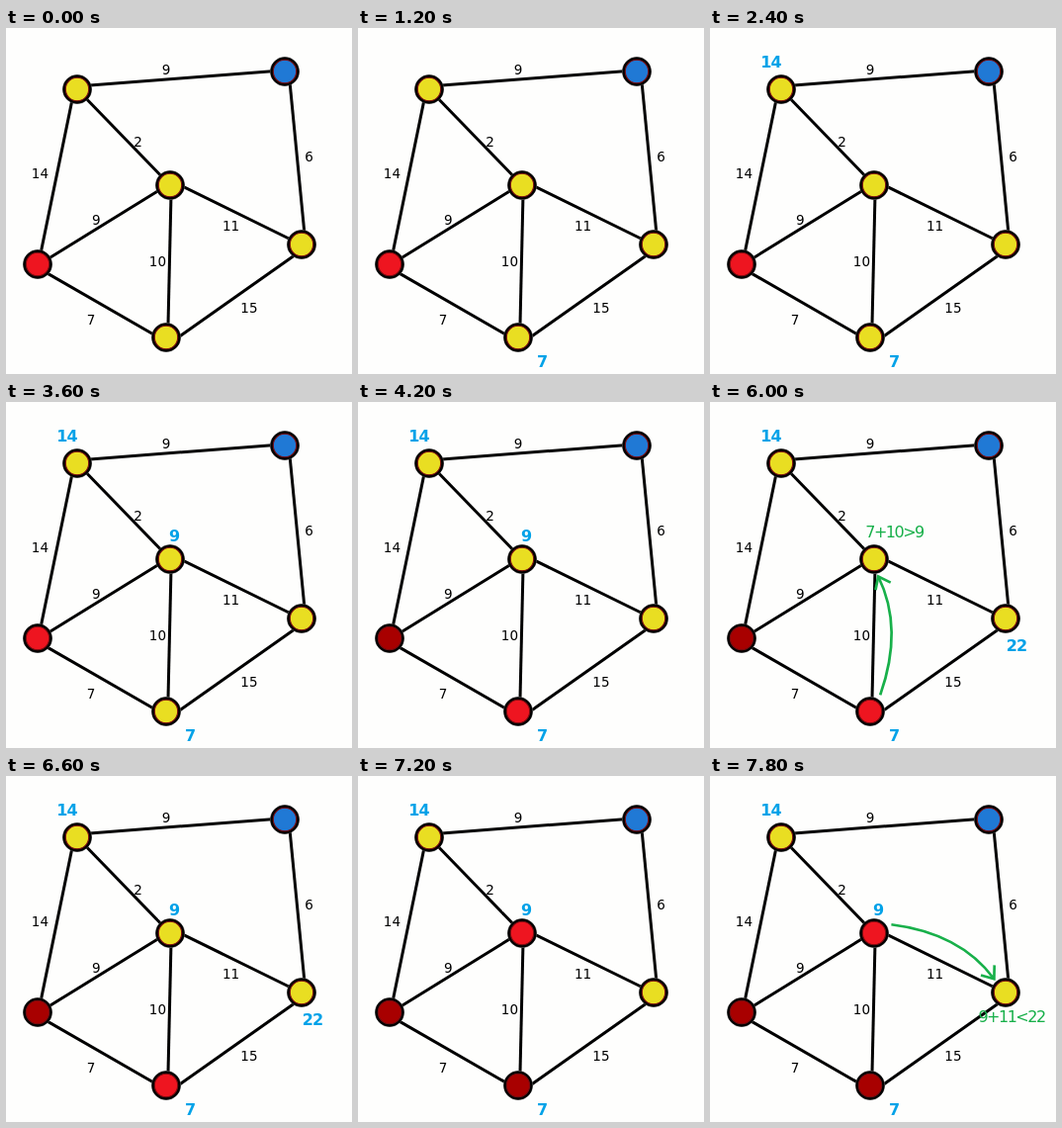
An HTML page for the animation above (8 s loop, 350 by 350 pixels).

```html
<!DOCTYPE html>
<html lang="en">
<head>
<meta charset="utf-8">
<title>Shortest path steps</title>
<style>
  html, body { margin: 0; width: 100%; height: 100%; overflow: hidden; background: #fefefd; }
  svg { display: block; width: 100%; height: 100%; }
  text { font: 13.5px "DejaVu Sans", sans-serif; text-anchor: middle; }
  .edge { stroke: #000; stroke-width: 3; }
  .halo { fill: none; stroke: #777; stroke-width: 1; }
  .node { stroke: #000; stroke-width: 2.8; }
  .rim { fill: none; stroke: #7a0c10; stroke-width: 1.1; }
  .value { font-size: 16px; font-weight: bold; letter-spacing: -1px; fill: #00a2e8; }
  .sum { font-size: 16px; letter-spacing: -1.5px; fill: #18b04a; }
  .arrow { fill: none; stroke: #18b04a; stroke-width: 2.7; }
</style>
</head>
<body>
<svg viewBox="0 0 350 350">
  <defs>
    <marker id="tip" orient="auto" markerUnits="userSpaceOnUse" markerWidth="30" markerHeight="30" overflow="visible">
      <path class="arrow" d="M-11-8.5L0 0L-11 8.5"/>
    </marker>
  </defs>
</svg>
<script>
const STEP = 600, LOOP = 8000;
const YELLOW = '#e9de22', RED = '#ee1520', DONE = '#a80000', BLUE = '#2079d5';
const svg = document.querySelector('svg');

function add(tag, attrs, content = '') {
  const el = document.createElementNS('http://www.w3.org/2000/svg', tag);
  for (const key in attrs) el.setAttribute(key, attrs[key]);
  el.textContent = content;
  return svg.appendChild(el);
}
const write = ([x, y], content, cls = '') => add('text', { x, y: y + 6, class: cls }, content);
const show = (el, on) => { el.style.visibility = on ? 'visible' : 'hidden'; };

// Point at p, moved along the direction from a to b and sideways (right is positive)
function offset(p, a, b, along, side) {
  const dx = b[0] - a[0], dy = b[1] - a[1], len = Math.hypot(dx, dy);
  return [p[0] + (dx * along - dy * side) / len, p[1] + (dy * along + dx * side) / len];
}
const mix = (a, b, t) => a.map((v, i) => v + (b[i] - v) * t);

const nodes = {
  start: { at: [32, 239] },
  top: { at: [72, 62], valueAt: [61.5, 34] },
  goal: { at: [282, 44] },
  middle: { at: [166, 159], valueAt: [170, 135] },
  right: { at: [299, 219], valueAt: [310, 246] },
  bottom: { at: [162, 313], valueAt: [186, 337] }
};
const weights = {};

// shifts: sideways nudge at both ends; gap and slide place the weight beside the middle
function edge(from, to, weight, shifts, gap, slide = 0) {
  const a = nodes[from].at, b = nodes[to].at;
  const p = offset(a, a, b, 0, shifts[0]), q = offset(b, a, b, 0, shifts[1]);
  add('line', { x1: p[0], y1: p[1], x2: q[0], y2: q[1], class: 'edge' });
  const [x, y] = offset(mix(p, q, .5), a, b, slide, gap);
  write([x, y - 1], weight);
  weights[from + to] = weight;
}
edge('top', 'goal', 9, [-3, -1.3], -10, -14);
edge('top', 'middle', 2, [0, 0], -7.5, 13);
edge('start', 'top', 14, [.8, -2.8], -17);
edge('start', 'middle', 9, [.8, -1.5], -8, -4);
edge('start', 'bottom', 7, [3, 3.7], 19);
edge('middle', 'right', 11, [-4.5, .3], 14);
edge('bottom', 'middle', 10, [1.7, 1.2], -12);
edge('bottom', 'right', 15, [7, 4.8], 17, 3);
edge('goal', 'right', 6, [-4, -4], -12);

for (const node of Object.values(nodes)) {
  const [cx, cy] = node.at;
  add('circle', { cx, cy, r: 14.6, class: 'halo' });
  node.disc = add('circle', { cx, cy, r: 13.2, class: 'node' });
  add('circle', { cx, cy, r: 11.7, class: 'rim' });
  if (node.valueAt) node.value = write(node.valueAt, '', 'value');
}

// A bowed arrow that leaves and arrives at an angle (degrees) beside the edge
function arrow(from, to, angle) {
  const a = nodes[from].at, b = nodes[to].at, side = Math.sign(angle);
  const around = (p, r, deg) => {
    const turn = deg * Math.PI / 180;
    return offset(p, a, b, r * Math.cos(turn), Math.abs(r) * Math.sin(turn));
  };
  const p = around(a, 19.5, angle), q = around(b, -18, angle / 2);
  const bend = offset(mix(p, q, .56), p, q, 0, 25 * side);
  return add('path', { d: `M${p}Q${bend} ${q}`, class: 'arrow', 'marker-end': 'url(#tip)' });
}

// Checks: neighbour, arrow angle, place of the sum
const visits = [
  { at: 'start', checks: [['bottom', -18, [171, 334]], ['top', 15, [57.5, 34]], ['middle', 36, [168, 132]]] },
  { at: 'bottom', checks: [['right', -15, [304.5, 195]], ['middle', 30, [186.5, 131]]] },
  { at: 'middle', clears: 'right', checks: [['right', -51, [305, 243]]] }
];

// Each visit is one scene, followed by two scenes per check: compare, then result
const scenes = [], best = { start: 0 }, done = [];
for (const { at, clears, checks } of visits) {
  const scene = (hidden, parts = []) =>
    scenes.push({ current: at, done: [...done], values: { ...best, [hidden]: '' }, parts });
  scene(clears);
  for (const [to, angle, place] of checks) {
    const weight = weights[at + to], total = best[at] + weight, known = best[to];
    const compare = known ? (total < known ? '<' : '>') + known : '';
    scene(to, [arrow(at, to, angle), write(place, `${best[at]}+${weight}${compare}`, 'sum')]);
    best[to] = Math.min(total, known ?? Infinity);
    scene();
  }
  done.push(at);
}

function draw(time) {
  const now = scenes[Math.floor(time % LOOP / STEP)];
  for (const [name, node] of Object.entries(nodes)) {
    node.disc.style.fill = name === now.current ? RED
      : now.done.includes(name) ? DONE
      : name === 'goal' ? BLUE : YELLOW;
    if (node.value) node.value.textContent = now.values[name] ?? '';
  }
  for (const scene of scenes) scene.parts.forEach(el => show(el, scene === now));
}

const began = performance.now();
function tick() {
  draw(performance.now() - began);
  requestAnimationFrame(tick);
}
tick();
</script>
</body>
</html>
```
